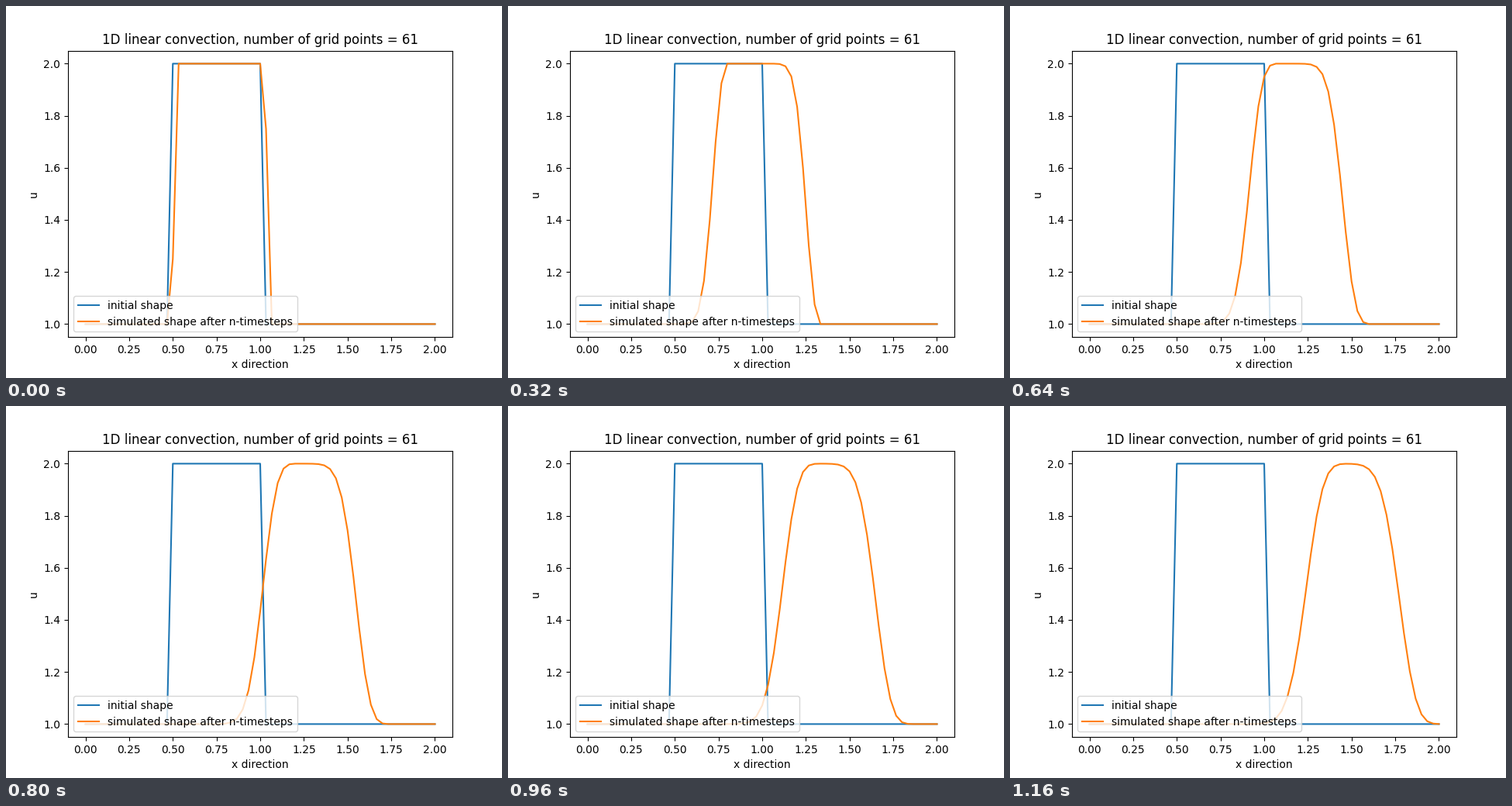
Write a matplotlib script that moves like this. It is 640x480 px and loops after 1.2 s.

```python
import numpy as np
import matplotlib.pyplot as plt
from matplotlib.animation import FuncAnimation

GRID_POINTS = 61
LENGTH = 2.0
COURANT = 0.75
FRAMES = 30
INTERVAL = 40  # ms

x = np.linspace(0, LENGTH, GRID_POINTS)
dx = LENGTH / (GRID_POINTS - 1)


def hat():
    """Square pulse of height 2 on 0.5 <= x <= 1."""
    u = np.ones(GRID_POINTS)
    u[round(0.5 / dx):round(1 / dx) + 1] = 2
    return u


def convect(steps):
    """Advance the pulse with the first-order upwind scheme."""
    u = hat()
    for _ in range(steps):
        u[1:] -= COURANT * (u[1:] - u[:-1])
    return u


fig, ax = plt.subplots(figsize=(6.4, 4.8), dpi=100)
ax.plot(x, hat(), label="initial shape")
wave, = ax.plot(x, convect(1), label="simulated shape after n-timesteps")
ax.set_title(f"1D linear convection, number of grid points = {GRID_POINTS}")
ax.set_xlabel("x direction")
ax.set_ylabel("u")
ax.legend(loc="lower left")


def update(frame):
    wave.set_ydata(convect(frame + 1))
    return wave,


anim = FuncAnimation(fig, update, frames=FRAMES, interval=INTERVAL,
                     repeat=True, repeat_delay=0, blit=False)
plt.show()
```
